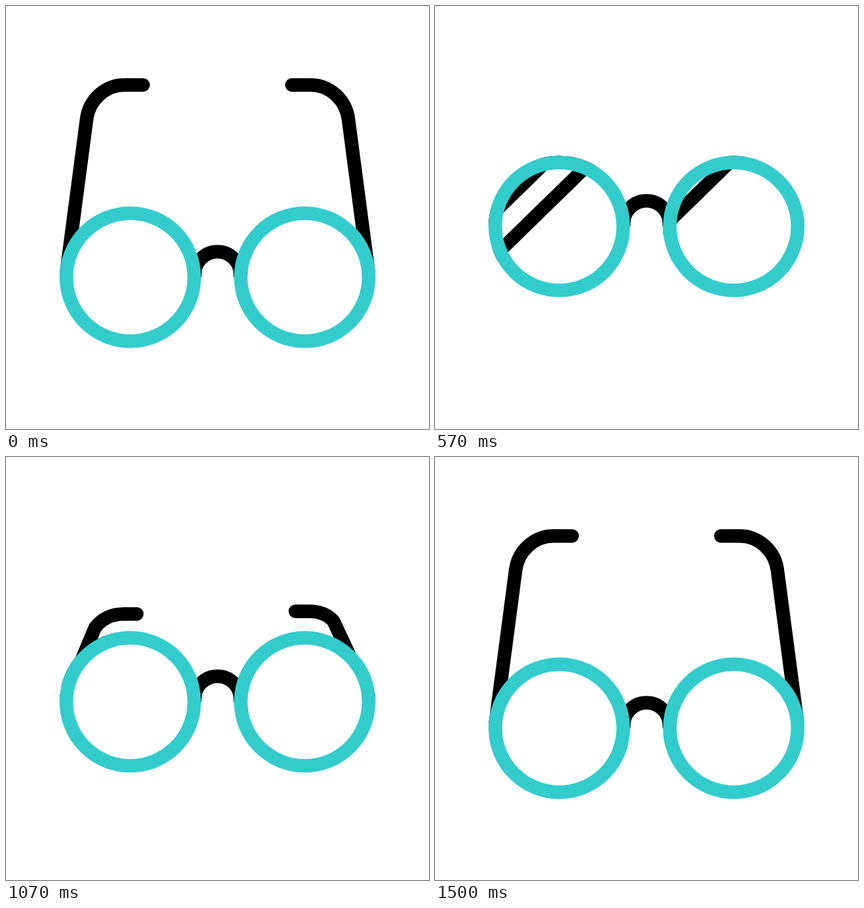
An HTML page for the animation above (2 s loop, 640 by 640 pixels).

```html
<!DOCTYPE html>
<html lang="en">
<head>
<meta charset="utf-8">
<title>Glasses</title>
<style>
html, body { margin: 0; width: 100%; height: 100%; overflow: hidden; background: #fff; }
svg { display: block; width: 100vw; height: 100vh; }
.dark { fill: none; stroke: #000; stroke-width: 20.5; stroke-linecap: round; stroke-linejoin: round; }
.ring { fill: none; stroke: #33cccc; stroke-width: 20.5; }
</style>
</head>
<body>
<svg viewBox="0 0 640 640">
  <defs><clipPath id="disc"><circle r="107"/></clipPath></defs>
  <path id="armL" class="dark"/>
  <path id="armR" class="dark"/>
  <g id="front">
    <path class="dark" style="stroke-linecap:butt" d="M285.5 0V-4.2a34.5 34.5 0 0 1 69 0V0"/>
    <g transform="translate(188 0)">
      <circle r="97" fill="#fff"/>
      <g clip-path="url(#disc)"><path id="shineL" d="M-140 -.7h280v20.2h-280zM-140 47h280v20.2h-280zM82 18h60v30.500h-56z"/></g>
      <circle class="ring" r="96.8"/>
    </g>
    <g transform="translate(452 0)">
      <circle r="97" fill="#fff"/>
      <g clip-path="url(#disc)"><path id="shineR" d="M-140 -.7h280v20.2h-280zM-140 47h280v20.2h-280z"/></g>
      <circle class="ring" r="96.8"/>
    </g>
  </g>
</svg>
<script>
const LOOP = 2000, FPS = 30, REST_Y = 410.4, LIFT = 79.7;
const get = id => document.getElementById(id);
const armL = get('armL'), armR = get('armR'), front = get('front');
const shineL = get('shineL'), shineR = get('shineR');

function ease(k, from, to) {
  const x = Math.min(1, Math.max(0, (k - from) / (to - from)));
  return x * x * (3 - 2 * x);
}

// Each pair is [rest value, change per pixel of lift].
const left = {
  tip: [207.5, -0.24], top: [119.4, 2.955], flat: [179, 0], out: [-29, 0.17],
  x: [122, 0.32], y: [171, 2.18], bendX: [3.8, 0.14], bendY: [-28.8, 0.416], hinge: 91.7
};
const right = {
  tip: [432.5, 0.132], top: [119.4, 2.857], flat: [461, -0.05], out: [29, -0.27],
  x: [518, -0.555], y: [171, 1.95], bendX: [-3.8, -0.1], bendY: [-28.8, 0.49], hinge: 548.3
};

function armPath(arm, lift) {
  const at = key => arm[key][0] + arm[key][1] * lift;
  const top = at('top'), flat = at('flat'), x = at('x'), y = at('y');
  return `M${at('tip')} ${top}L${flat} ${top}C${flat + at('out')} ${top} ` +
    `${x + at('bendX')} ${y + at('bendY')} ${x} ${y}L${arm.hinge} ${REST_Y - lift - 9}`;
}

// Diagonal position of the shine in the left lens; it sweeps twice.
function shineAt(k) {
  return k < 30.5 ? -132 + 26.2 * (k - 17) : -25 + 39.5 * (k - 37);
}

function placeShine(el, s) {
  el.setAttribute('transform', `rotate(-44.3) translate(0 ${s / Math.SQRT2})`);
}

function draw(ms) {
  const k = Math.floor((ms % LOOP + 5) * FPS / 1000) % 60;
  const lift = LIFT * (ease(k, 6.6, 18.3) - ease(k, 20.2, 43.85));
  armL.setAttribute('d', armPath(left, lift));
  armR.setAttribute('d', armPath(right, lift));
  front.setAttribute('transform', `translate(0 ${REST_Y - lift})`);
  const s = shineAt(k);
  placeShine(shineL, s);
  placeShine(shineR, s - 53);
}

const start = performance.now();
function tick() {
  draw(performance.now() - start);
  requestAnimationFrame(tick);
}
tick();
</script>
</body>
</html>
```
